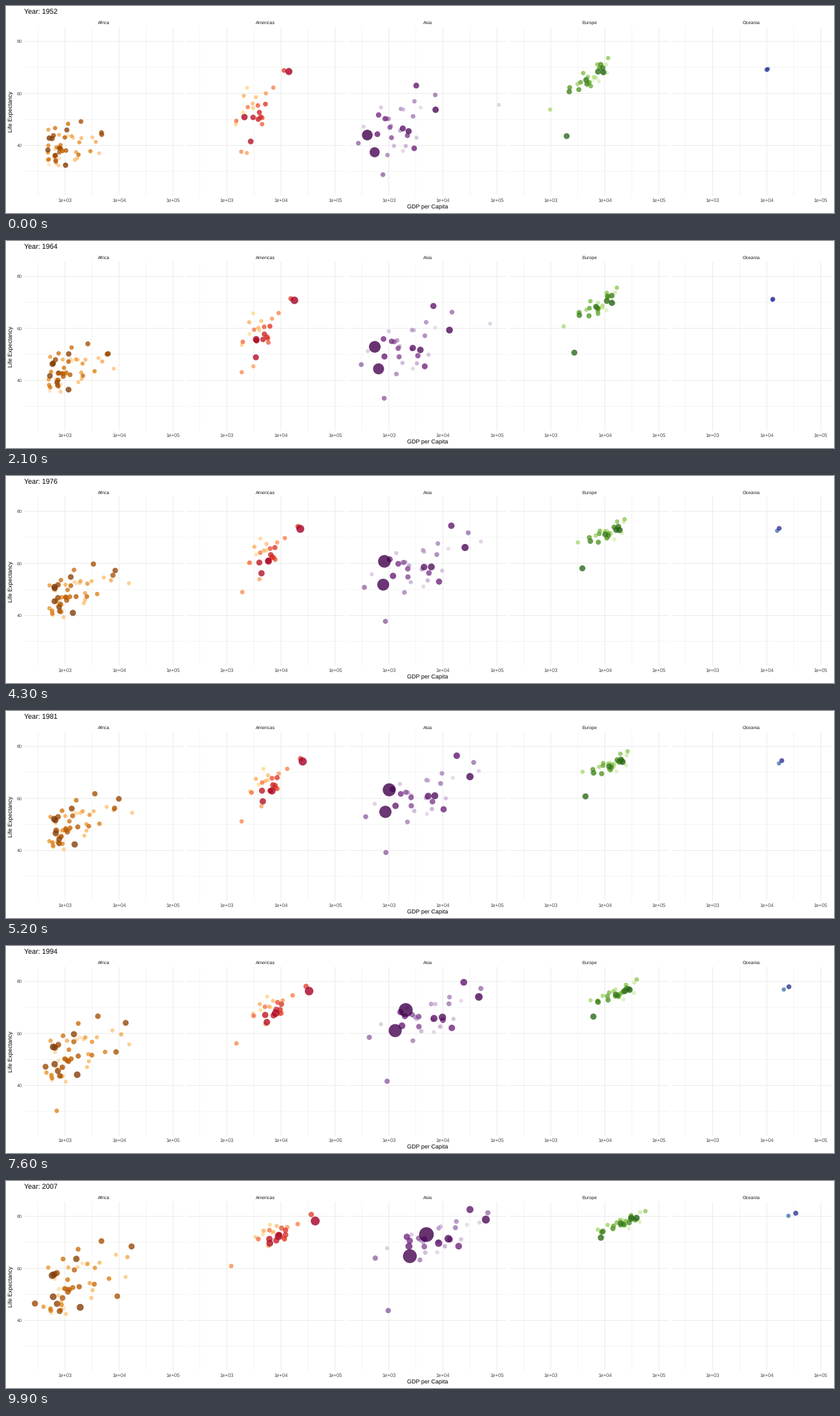
These frames come from a looping animation (1280x320 px, 10000 ms). A matplotlib script:

```python
import numpy as np
import matplotlib.pyplot as plt
from matplotlib.animation import FuncAnimation
from matplotlib.collections import LineCollection
from matplotlib.colors import LinearSegmentedColormap

plt.rcParams["font.family"] = "Liberation Sans"
plt.rcParams["text.hinting"] = "none"

W, H, DPI = 1280, 320, 80
PT = 72 / DPI  # points per pixel
FRAMES, INTERVAL = 100, 100
FIRST, LAST = 1952, 2007
KEYS = np.linspace(0, 1, 12)  # one survey every five years

LEFT, TOP, BOTTOM = 28.4, 32.2, 293.4
PANEL_W, STEP, DECADE = 245.8, 250.3, 83.6
ALPHA, MAX_POP, MAX_LIFE = 0.8, 1319, 82

# leaders: final population (millions), then GDP and life expectancy pairs
# spread evenly over the years; only the dots that stand out.
# crowd: (start, middle, end) values; x is log GDP, slope is life per decade of
# GDP, noise is the scatter of life about that slope.
REGIONS = {
    "Africa": dict(
        ramp=["#7F3B08", "#B35806", "#E08214", "#FDB863", "#FEE0B6"],
        growth=0.27, seed=4,
        leaders=[(8.9, 493, 40, 560, 44, 750, 46, 680, 27, 863, 46),
                 (65, 781, 39, 735, 48, 278, 46.5),
                 (44, 4725, 45, 8300, 57, 9270, 49.3),
                 (1.5, 4293, 37, 18400, 54.7, 13206, 56.7)],
        crowd=dict(n=48, pops=(0.6, 130), skew=0.25,
                   x=(2.98, 3.12, 3.16), x_sd=(0.23, 0.28, 0.35),
                   life=(39.5, 49.5, 54.5), slope=(5, 10, 12), noise=(4.2, 4, 6))),
    "Americas": dict(
        ramp=["#A50026", "#D73027", "#F46D43", "#FDAE61", "#FEE090"],
        growth=0.42, seed=7,
        leaders=[(301, 13990, 68.4, 24500, 74, 42952, 78.2),
                 (190, 2109, 50.9, 6850, 62.4, 9066, 72.4),
                 (33, 11367, 68.8, 22500, 75, 36319, 80.7),
                 (8.5, 1840, 37.6, 1940, 50.7, 1202, 60.9)],
        crowd=dict(n=21, pops=(1.1, 110), skew=0,
                   x=(3.5, 3.75, 3.9), x_sd=(0.18, 0.18, 0.2),
                   life=(53, 65.5, 73.8), slope=(20, 14, 6), noise=(6, 3.4, 2.2))),
    "Asia": dict(
        ramp=["#40004B", "#762A83", "#9970AB", "#C2A5CF", "#E7D4E8"],
        growth=0.4, seed=2,
        leaders=[(1319, 400, 44, 660, 58, 1400, 67.2, 4959, 73),
                 (1110, 547, 37.4, 710, 48.5, 1000, 59.5, 2452, 64.7),
                 (127, 3217, 63, 17950, 76.2, 31656, 82.6),
                 (32, 779, 28.8, 880, 39.1, 975, 43.8),
                 (2.5, 108382, 55.6, 45000, 70.3, 47307, 77.6)],
        crowd=dict(n=28, pops=(2, 200), skew=0,
                   x=(3.18, 3.6, 3.85), x_sd=(0.34, 0.46, 0.48),
                   life=(47.5, 61, 71.5), slope=(9, 9, 8), noise=(6, 4.6, 3.2))),
    "Europe": dict(
        ramp=["#276419", "#4D9221", "#7FBC41", "#B8E186", "#E6F5D0"],
        growth=0.75, seed=5,
        leaders=[(71, 1969, 43.6, 4250, 60.3, 8458, 71.8),
                 (4.6, 974, 53.8, 3800, 70.2, 7446, 74.9)],
        crowd=dict(n=28, pops=(1.2, 80), skew=-0.2,
                   x=(3.77, 4.14, 4.38), x_sd=(0.2, 0.18, 0.21),
                   life=(66.5, 72.8, 77.8), slope=(14, 8, 8), noise=(1.9, 1.3, 1))),
    "Oceania": dict(
        ramp=["#313695", "#4575B4"], growth=0.48,
        leaders=[(20.4, 10040, 69.1, 18400, 74.1, 34435, 81.2),
                 (4.1, 10557, 69.4, 16500, 73, 25185, 80.2)]),
}


def spread(values):
    """Sample evenly spaced values at the survey years."""
    return np.interp(KEYS, np.linspace(0, 1, len(values)), values)


def px_x(log_gdp, panel):
    return LEFT + panel * STEP + 62.8 + (log_gdp - 3) * DECADE


def px_y(life):
    return 54.6 + (80 - life) * 4.025


def diameter(pop):
    size = 2 + 8 * np.sqrt(pop / MAX_POP)
    return 0.75 * (2.845 * size + 0.945) + 0.7


def standard(rng, n):
    """A column of normal numbers with mean 0 and spread 1 in this sample."""
    z = np.clip(rng.normal(size=(n, 1)), -1.9, 1.9)
    return (z - z.mean()) / z.std()


def make_crowd(seed, n, pops, skew, x, x_sd, life, slope, noise):
    rng = np.random.default_rng(seed)
    u, v = standard(rng, n), standard(rng, n)
    u = u + skew * (u * u - 1)
    wander = rng.normal(size=(2, n, len(KEYS))).cumsum(axis=2)
    dx = spread(x_sd) * u + 0.012 * wander[0]
    y = spread(life) + spread(slope) * dx + spread(noise) * v + 0.25 * wander[1]
    pop = rng.permutation(np.geomspace(*pops, n))
    return pop, spread(x) + dx, np.minimum(y, MAX_LIFE)


def build(panel, region):
    """Pixel paths, diameters and colours of one panel's dots."""
    rows = region["leaders"]
    pop = np.array([r[0] for r in rows])
    x = np.array([spread(np.log10(r[1::2])) for r in rows])
    y = np.array([spread(r[2::2]) for r in rows])
    if "crowd" in region:
        more = make_crowd(region["seed"], **region["crowd"])
        pop, x, y = (np.concatenate(p) for p in zip((pop, x, y), more))
    order = pop.argsort()  # large dots on top
    pop, x, y = pop[order], x[order], y[order]
    start = region["growth"]
    size = diameter(pop[:, None] * (start + (1 - start) * KEYS))
    ramp = LinearSegmentedColormap.from_list("ramp", region["ramp"])
    return px_x(x, panel), px_y(y), size, ramp(np.linspace(1, 0, len(pop)))


fig = plt.figure(figsize=(W / DPI, H / DPI), dpi=DPI, facecolor="white")
ax = fig.add_axes([0, 0, 1, 1])
ax.set(xlim=(0, W), ylim=(H, 0))
ax.axis("off")


def label(x, y, text, size, color="black", **kw):
    return ax.text(x, y, text, fontsize=size * PT, color=color, **kw)


def grid(lines, width):
    ax.add_collection(LineCollection(lines, colors="#EBEBEB", zorder=1, snap=False,
                                     linewidths=width * PT, capstyle="butt"))


major, minor = [], []
for p, name in enumerate(REGIONS):
    x0 = LEFT + p * STEP
    x1 = x0 + PANEL_W
    for life in range(30, 81, 10):
        group = minor if life % 20 else major
        group.append([(x0, px_y(life)), (x1, px_y(life))])
    for half in range(5, 11):
        group = minor if half % 2 else major
        x = px_x(half / 2, p)
        group.append([(x, TOP), (x, BOTTOM)])
        if half % 2 == 0:
            label(x, 302.6, f"1e+0{half // 2}", 7.6, "#4D4D4D", ha="center")
    label((x0 + x1) / 2, 28.2, name, 7.2, "#1A1A1A", ha="center")
grid(minor, 0.53)
grid(major, 1.07)

for life in (40, 60, 80):
    label(24.8, px_y(life) + 2.7, str(life), 7.4, "#4D4D4D", ha="right")
label(652, 313, "GDP per Capita", 9, ha="center")
label(8, 163, "Life Expectancy", 9, ha="center", va="center", rotation=90)
title = label(28.4, 12, "", 10.8)

parts = [build(p, region) for p, region in enumerate(REGIONS.values())]
xs, ys, sizes, colors = (np.concatenate(p) for p in zip(*parts))
dots = ax.scatter(xs[:, 0], ys[:, 0], c=colors, alpha=ALPHA, linewidths=0, zorder=3)


def update(frame):
    t = frame / (FRAMES - 1)
    pos = t * (len(KEYS) - 1)
    k = min(int(pos), len(KEYS) - 2)
    f = pos - k
    x, y, d = (a[:, k] * (1 - f) + a[:, k + 1] * f for a in (xs, ys, sizes))
    dots.set_offsets(np.column_stack([x, y]))
    dots.set_sizes((d * PT) ** 2)
    title.set_text(f"Year: {round(FIRST + (LAST - FIRST) * t)}")
    return dots, title


anim = FuncAnimation(fig, update, frames=FRAMES, interval=INTERVAL,
                     repeat=True, repeat_delay=0, blit=False)
plt.show()
```
